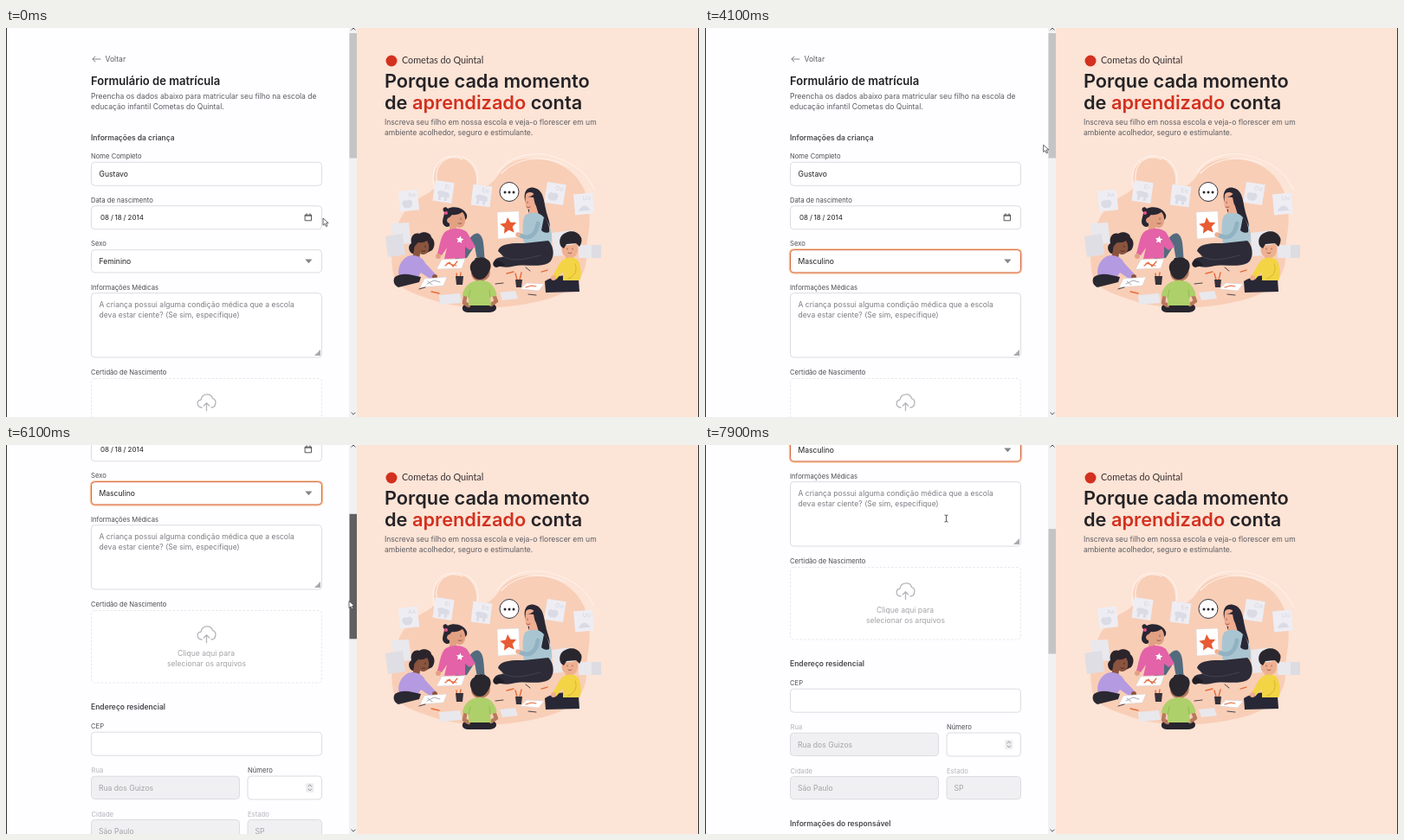
These frames come from a looping animation (800x450 px, 8000 ms). An HTML page:

```html
<!DOCTYPE html>
<html lang="pt-BR">
<head>
<meta charset="utf-8">
<title>Formulário de matrícula</title>
<style>
  html, body { margin: 0; width: 100%; height: 100%; overflow: hidden; background: #fff; }
  svg { display: block; width: 800px; height: 450px; }
  text { font-family: Inter, "Open Sans", sans-serif; font-size: 8.6px; font-optical-sizing: none; fill: #1f1f22; white-space: pre; }
  .title { font-size: 13.05px; font-weight: 600; }
  .section { font-size: 8.5px; font-weight: 600; fill: #48484d; }
  .label { font-size: 7.65px; fill: #4d4d53; }
  .note { font-size: 8.55px; fill: #5c5c62; }
  .hint { fill: #7d7d84; }
  .faint { fill: #a3a3a8; }
  .off { font-size: 7.65px; fill: #b4b4ba; }
  .date { font-size: 8px; }
  .hero { font-size: 21.75px; font-weight: 600; fill: #242226; }
  .brand { font-family: Lato, sans-serif; font-size: 10.8px; fill: #3a3033; }
  .card { font-size: 7px; fill: #d3d5df; }
  .line { fill: none; stroke-linecap: round; stroke-linejoin: round; }
</style>
</head>
<body>
<svg viewBox="0 0 800 450">
  <rect width="800" height="450" fill="#fefdff"/>
  <g id="form"></g>

  <rect x="396" width="9.5" height="450" fill="#f1f1f1"/>
  <rect id="thumb" x="396.5" y="6" width="8.5" height="144.5"/>
  <path d="M398.8 2.2 401 0l2.2 2.2M398.8 445l2.2 2.2 2.2-2.2" class="line" stroke="#555"/>

  <rect x="405" width="395" height="450" fill="#fce4d6"/>
  <circle cx="445" cy="38" r="6.5" fill="#d3301f"/>
  <text x="457" y="41.3" class="brand">Cometas do Quintal</text>
  <text x="437" y="69" class="hero">Porque cada momento</text>
  <text x="437" y="94" class="hero">de <tspan fill="#d3301f" style="fill:#d3301f">aprendizado</tspan> conta</text>
  <text x="437" y="112.3" class="note">Inscreva seu filho em nossa escola e veja-o florescer em um</text>
  <text x="437" y="124.3" class="note">ambiente acolhedor, seguro e estimulante.</text>

  <!-- backdrop -->
  <path d="M447 284C441 255 450 218 470 202C481 193 491 191 496 183C490 162 503 149 518 149C535 150 544 163 543 180C552 187 561 181 567 172C577 155 594 149 613 151C641 153 664 170 671 197C678 226 669 245 670 263C671 290 650 308 620 315C580 325 530 328 490 314C468 306 450 301 447 284Z" fill="#f8ceb7"/>
  <path d="M496 191C487 164 500 146 521 148C543 151 550 171 541 187M501 190C488 160 508 143 527 152M567 168C582 145 614 141 638 151C661 159 673 173 679 187M572 168C590 149 620 146 647 159" class="line" stroke="#fff0e8" stroke-width="1.2"/>
  <g id="cards"></g>
  <g fill="#e9e8ed">
    <path d="M445 226l20-1 3 24-20 2z"/>
    <path d="M438 241l20-3 3 24-20 3z" fill="#dfdee5"/>
    <path d="M630 237l24-3 2 28-24 2z"/>
    <path d="M661 251h25v15h-25z"/><path d="M676 251h11v15h-11z" fill="#dddce3"/>
    <path d="M500 309l24-2 2 11-25 2z"/><path d="M570 306l18-2 3 9-18 2z"/>
  </g>
  <circle cx="581" cy="189.5" r="11" fill="#fff" stroke="#35313a"/>
  <g fill="#29262d"><circle cx="576" cy="190" r="1.5"/><circle cx="581" cy="190" r="1.5"/><circle cx="586" cy="190" r="1.5"/></g>

  <!-- teacher -->
  <path d="M599 199C597 188 603 183 610 185C620 187 621 199 623 209C625 220 630 226 627 236C622 240 612 238 609 230Z" fill="#292733"/>
  <path d="M600 193C601 189 609 189 611 194L612 206 615 216 604 217 604 210C599 210 599 202 600 193Z" fill="#efad91"/>
  <path d="M600 195C606 196 610 193 611 188L616 209C610 207 610 199 609 196Z" fill="#292733"/>
  <path d="M599 217C606 212 616 213 621 219C628 225 632 240 629 250L598 252C597 240 595 226 599 217Z" fill="#a9c5d2"/>
  <path d="M621 219C625 222 628 230 627 236 623 238 620 236 618 234Z" fill="#292733"/>
  <path d="M568 258C570 249 584 249 598 249L626 246C633 252 634 267 626 272C613 278 600 272 584 276C574 278 564 275 564 270C564 266 570 265 575 265Z" fill="#2c2b37"/>
  <path d="M573 264C588 272 603 266 617 263" class="line" stroke="#4b4a58" stroke-width=".8"/>
  <path d="M564 269c4-2 8 2 12 5l-10 3c-4-1-5-5-2-8z" fill="#1f1e27"/>
  <path d="M567 213l25-1 1 30-25 2z" fill="#fff" stroke="#d9d4d6" stroke-width=".5"/>
  <path id="paperStar" fill="#e85b33"/>
  <path d="M614 226C612 240 604 245 594 240" class="line" stroke="#91b2c2" stroke-width="5"/>
  <circle cx="591" cy="239" r="2.7" fill="#efad91"/>
  <path d="M602 201v1.5M601 207q2 1.5 4 0" class="line" stroke="#8d3d32" stroke-width=".7"/>

  <!-- pink girl -->
  <path d="M506 213c-4-4 1-8 4-4 7-4 19-1 22 7 1 5-2 7-5 6l-13 4c-2 7-10 4-10-2 0-4 2-7 2-11z" fill="#292631"/>
  <path d="M515 216c6 1 10-2 12-3 4 4 4 13 1 16-3 3-6 2-8 1v6h-8v-10c-4-1-4-6 0-7z" fill="#e3a184"/>
  <circle cx="508" cy="214" r="2" fill="#e95492"/>
  <path d="M526 259c6-13 15-26 21-20 6 5 4 21 6 29l-9 1-3-17-9 14-14 1z" fill="#536b7e"/>
  <path d="M508 235C515 231 526 231 532 236L542 253 535 257 530 253 530 266 506 267 509 254 503 263 498 261C501 251 502 239 508 235Z" fill="#e462a7"/>
  <path id="shirtStar" fill="#fff"/>
  <path d="M542 266h11c3 2 3 5 0 6h-14z" fill="#27252d"/>
  <circle cx="499" cy="264" r="3" fill="#e3a184"/>
  <path d="M525 220v1.5M522 226q2 1 4 0" class="line" stroke="#713e32" stroke-width=".7"/>

  <!-- lilac girl -->
  <path d="M469 261c-5-3-5-10-1-12-2-8 4-13 9-11 5-4 14-1 14 4 5 4 4 11 1 15l-8 4z" fill="#2b242b"/>
  <path d="M476 248q6 1 10-2c3 4 3 12 0 14-3 3-6 2-8 1l-1 6-8-1 2-9c0-5 2-6 5-9z" fill="#8a543e"/>
  <path d="M454 288C451 278 456 268 464 264C472 261 481 265 484 272L496 285 491 291 479 283 474 290 458 292Z" fill="#b49ae0"/>
  <path d="M449 288c9-6 20-2 30 0l-2 6-24 6c-5-2-7-8-4-12z" fill="#2a2831"/>
  <circle cx="495" cy="288" r="3" fill="#8a543e"/>
  <path d="M484 252v1.5M480 258q2 1 4 0" class="line" stroke="#321e1b" stroke-width=".7"/>

  <!-- yellow boy -->
  <path d="M622 293c11-7 26-9 39-3l1 15-39 1z" fill="#282735"/>
  <path d="M643 250q8 3 15-1c4 4 2 15-3 16l-1 6h-8v-7c-4-1-6-8-3-14z" fill="#eeb090"/>
  <path d="M641 253c-4-6-1-14 5-16 5-3 14-2 17 4 3 3 1 9-1 12l-4-4-11 1-3 5z" fill="#29262d"/>
  <path d="M643 268C650 264 658 265 661 270C665 279 664 290 662 292L643 292 643 282 635 291 631 286C636 280 638 272 643 268Z" fill="#f3d445"/>
  <path d="M657 273c3 7 0 14-8 17" class="line" stroke="#d9ae2c" stroke-width=".9"/>
  <circle cx="632" cy="289" r="3" fill="#eeb090"/>
  <path d="M648 255v1M654 255v1M649 260q2 2 4 0" class="line" stroke="#763f34" stroke-width=".7"/>

  <!-- drawings and pencils -->
  <g fill="#fff" stroke="#d5cdd0" stroke-width=".5">
    <path d="M503 268l27-1-4 11-29 1z"/><path d="M483 290l26-2-4 10-27 2z"/>
    <path d="M601 295l20 1-6 8-21-2z"/>
  </g>
  <path d="M507 275l5-4 4 5 5-6M600 300l7-2 5 1M509 272l11 3" class="line" stroke="#e46a3c" stroke-width="1.2"/>
  <path d="M486 296l8-4 7 2M487 293l5 4" class="line" stroke="#8d91a0" stroke-width=".8"/>
  <path d="M521 290l-1-6M524 290l1-7M590 291l-2-7M593 291l2-8" class="line" stroke="#e76c39" stroke-width="1.4"/>
  <path d="M519 287h9l-1 10h-7zM588 291h8l-1 9h-6z" fill="#36313a"/>
  <path d="M546 266l7 2M618 282l7-2M586 282l-8 2M491 305l9 2" class="line" stroke="#e76c39" stroke-width="1.3"/>
  <path d="M565 296l9-1M600 277l5 4M477 302l7-2M603 308l9 1" class="line" stroke="#4a4249"/>

  <!-- green boy -->
  <path d="M528 321c8-5 31-5 37 0 3 4-1 8-7 8h-25c-5 0-8-4-5-8z" fill="#27252e"/>
  <path d="M538 278c-3 7 1 13 5 14v5h9v-5c6-2 8-8 6-15z" fill="#b87a5c"/>
  <path d="M537 282c-3-7 0-12 5-14 4-4 9-3 12-1 6 2 7 9 4 14-3 7-7 10-11 10-5 0-8-3-10-9z" fill="#29262d"/>
  <path d="M531 305l-2 13 5 3M562 306l4 10-6 4" class="line" stroke="#b87a5c" stroke-width="4.5"/>
  <path d="M536 295C542 291 555 291 560 296C565 302 567 307 566 310L559 311 560 321H534L534 311 527 310C527 304 531 298 536 295Z" fill="#aed06a"/>
  <path d="M536 303l-2 9M558 303l1 9" class="line" stroke="#8eb650" stroke-width=".9"/>

  <path d="M.5 0v450M799.5 0v450" stroke="#343336"/>
  <path id="arrow" d="M0 0v8.2l2-1.8 1.5 3.2 1.5-.7-1.5-3.1 2.7-.2z" fill="#fff" stroke="#3b3b42" stroke-width=".8"/>
  <path id="beam" d="M-1.6-4q1.6 0 1.6 1 0-1 1.6-1M0-3V3M-1.6 4q1.6 0 1.6-1 0 1 1.6 1" class="line" stroke="#333" stroke-width=".8"/>
</svg>
<script>
  const LOOP = 8000, STEP = 100;
  const FOCUS_AT = 2100, CHOOSE_AT = 3500, HOVER_AT = 4300, GRAB_AT = 4700, DROP_AT = 7200;
  const SCROLL_RATIO = 2.9, THUMB_TOP = 6;
  const $ = id => document.getElementById(id);

  const text = (x, y, cls, str, extra = '') => `<text x="${x}" y="${y}" class="${cls}" ${extra}>${str}</text>`;
  const box = (x, y, w, h, extra = '') =>
    `<rect x="${x}" y="${y}" width="${w}" height="${h}" rx="4" fill="#fff" stroke="#d9d9df" stroke-width=".9" ${extra}/>`;
  const wide = (y, h = 27, extra) => box(98.5, y, 266, h, extra);
  const disabled = (x, y, w, label, value) =>
    text(x, y - 4, 'off', label) + box(x, y, w, 26.3, 'style="fill:#f0f0f2"') + text(x + 8.5, y + 16.3, 'faint', value);
  const stroke = (d, color, width = 1) => `<path class="line" d="${d}" stroke="${color}" stroke-width="${width}"/>`;

  $('form').innerHTML = [
    stroke('M109 36H100M103 33l-3 3 3 3', '#77777d', .9),
    text(114.5, 39, 'note', 'Voltar'),
    text(98, 66.2, 'title', 'Formulário de matrícula'),
    text(98, 82, 'note', 'Preencha os dados abaixo para matricular seu filho na escola de'),
    text(98, 94, 'note', 'educação infantil Cometas do Quintal.'),
    text(98, 129.5, 'section', 'Informações da criança'),
    text(98, 151.2, 'label', 'Nome Completo'),
    wide(155.3), text(107.5, 172, '', 'Gustavo'),
    text(98, 201.5, 'label', 'Data de nascimento'),
    wide(205.8),
    text(109, 222, 'date', '08'), text(121, 222, 'date', '/'), text(125.5, 222, 'date', '18'),
    text(135.5, 222, 'date', '/'), text(140.5, 222, 'date', '2014'),
    stroke('M345.5 216.2h7v6.6h-7zM345.5 217.2h7M347 214.8v1.4M351 214.8v1.4', '#444449', .9),
    text(98, 252.2, 'label', 'Sexo'),
    '<rect id="glow" x="97.9" y="256.1" width="267.2" height="27.4" rx="4.5" fill="none" stroke="#fbcfa4" stroke-width="2.4"/>',
    wide(256.7, 26.2, 'id="select"'),
    text(107.5, 272.6, '', '', 'id="choice"'),
    '<path d="M345.3 267.5h8.2l-4.1 4.8z" fill="#85858b"/>',
    text(98, 302.8, 'label', 'Informações Médicas'),
    wide(306.7, 74.3),
    text(107.5, 323, 'hint', 'A criança possui alguma condição médica que a escola'),
    text(107.5, 335, 'hint', 'deva estar ciente? (Se sim, especifique)'),
    '<path d="M363 372v7h-7z" fill="#aaaab0"/>',
    text(98, 401.2, 'label', 'Certidão de Nascimento'),
    wide(405.5, 83.5, 'stroke-dasharray="2.5 2" style="stroke:#e5e5e9"'),
    stroke('M226 439c-6-.3-6.5-8-1-8.8 1-8 12-8.5 13.5-1.5 5 1 4.5 10-1.5 10.3M231.5 442.5V434M228.3 437l3.2-3.2 3.2 3.2', '#b5b5ba', 1.3),
    text(231, 458, 'faint', 'Clique aqui para', 'text-anchor="middle"'),
    text(231.5, 470, 'faint', 'selecionar os arquivos', 'text-anchor="middle"'),
    text(98, 520.3, 'section', 'Endereço residencial'),
    text(98, 542, 'label', 'CEP'),
    wide(546.2),
    disabled(98.5, 597.2, 171, 'Rua', 'Rua dos Guizos'),
    text(279, 593.2, 'label', 'Número'),
    box(279, 597, 85.5, 27),
    '<rect x="346.3" y="605.2" width="9" height="10.5" rx="1" fill="#ececef"/>',
    stroke('M349 608.8l1.8-1.8 1.8 1.8M349 612l1.8 1.8 1.8-1.8', '#85858b', .9),
    disabled(98.5, 647.5, 171, 'Cidade', 'São Paulo'),
    disabled(279, 647.5, 85.5, 'Estado', 'SP'),
    text(98, 705.3, 'section', 'Informações do responsável')
  ].join('');

  const card = (x, y, turn, label, art) => `<g transform="translate(${x} ${y}) rotate(${turn})">
    <rect x="-11" y="-12" width="22" height="24" fill="#eeedf3"/>
    <text class="card" x="4" y="-4" text-anchor="middle">${label}</text>
    <path d="${art}" fill="#dadbe4"/></g>`;
  const apple = 'M-2 0c3-2 6 0 6 3 0 4-4 7-6 5-2 2-6-1-6-5 0-3 3-5 6-3z';
  const beast = 'M-7 1c3-3 8-2 10-1 4-1 5 3 4 6h-2v4h-3v-4h-4v4h-3v-5z';
  $('cards').innerHTML =
    card(465, 199.5, -6, 'Aa', apple) + card(505, 189.5, 8, 'Ei', beast) + card(549, 194, 7, 'Ee', beast) +
    card(634, 191.5, 9, 'Oo', apple) + card(667, 203.5, -5, 'Uu', 'M-7 8q7-12 14 0z');

  const star = (cx, cy, r, turn) => 'M' + Array.from({ length: 10 }, (_, i) => {
    const angle = i * Math.PI / 5 - Math.PI / 2 + turn, radius = i % 2 ? r * .48 : r;
    return `${cx + radius * Math.cos(angle)} ${cy + radius * Math.sin(angle)}`;
  }).join('L') + 'Z';
  $('paperStar').setAttribute('d', star(580, 229, 10, -.1));
  $('shirtStar').setAttribute('d', star(524, 245, 4.5, .15));

  // Each key is [time, ...values]; values ease between neighbouring keys.
  const smooth = p => p * p * (3 - 2 * p);
  const linear = p => p;
  function sample(keys, t, ease) {
    const next = keys.findIndex(k => k[0] > t);
    if (next < 0) return keys.at(-1).slice(1);
    const a = keys[next - 1], b = keys[next], p = ease((t - a[0]) / (b[0] - a[0]));
    return a.slice(1).map((v, i) => v + (b[i + 1] - v) * p);
  }
  const scrollKeys = [[0, 0], [5000, 0], [5400, 119], [6100, 214], [6800, 264]];
  const pointerKeys = [
    [0, 366, 220], [700, 366, 220], [1700, 344, 267], [2200, 344, 267], [2900, 335, 288], [3500, 335, 288],
    [4300, 401, 107], [5000, 401, 107], [5400, 398, 148.5], [6100, 396, 180.5], [6800, 396, 197.5],
    [7200, 396, 197.5], [7700, 278.5, 85]
  ];

  function draw(t) {
    const [scroll] = sample(scrollKeys, t, linear);
    const dragging = t >= GRAB_AT && t < DROP_AT;
    const [x, y] = sample(pointerKeys, t, dragging ? linear : smooth);
    const focused = t >= FOCUS_AT;

    $('form').setAttribute('transform', `translate(0 ${-scroll})`);
    $('thumb').setAttribute('y', THUMB_TOP + scroll / SCROLL_RATIO);
    $('thumb').setAttribute('fill', dragging ? '#606060' : t >= HOVER_AT && t < GRAB_AT ? '#a8a8a8' : '#c4c4c4');

    $('glow').style.display = focused ? '' : 'none';
    $('select').style.stroke = focused ? '#cf5434' : '';
    $('choice').textContent = t >= CHOOSE_AT ? 'Masculino' : 'Feminino';

    const typing = t > DROP_AT && x < 364 && y < 118;
    $('arrow').style.display = typing ? 'none' : '';
    $('beam').style.display = typing ? '' : 'none';
    $(typing ? 'beam' : 'arrow').setAttribute('transform', `translate(${x} ${y})`);
  }

  const start = performance.now();
  function tick() {
    const t = (performance.now() - start) % LOOP;
    draw(Math.floor(t / STEP) * STEP);
    requestAnimationFrame(tick);
  }
  tick();
</script>
</body>
</html>
```
